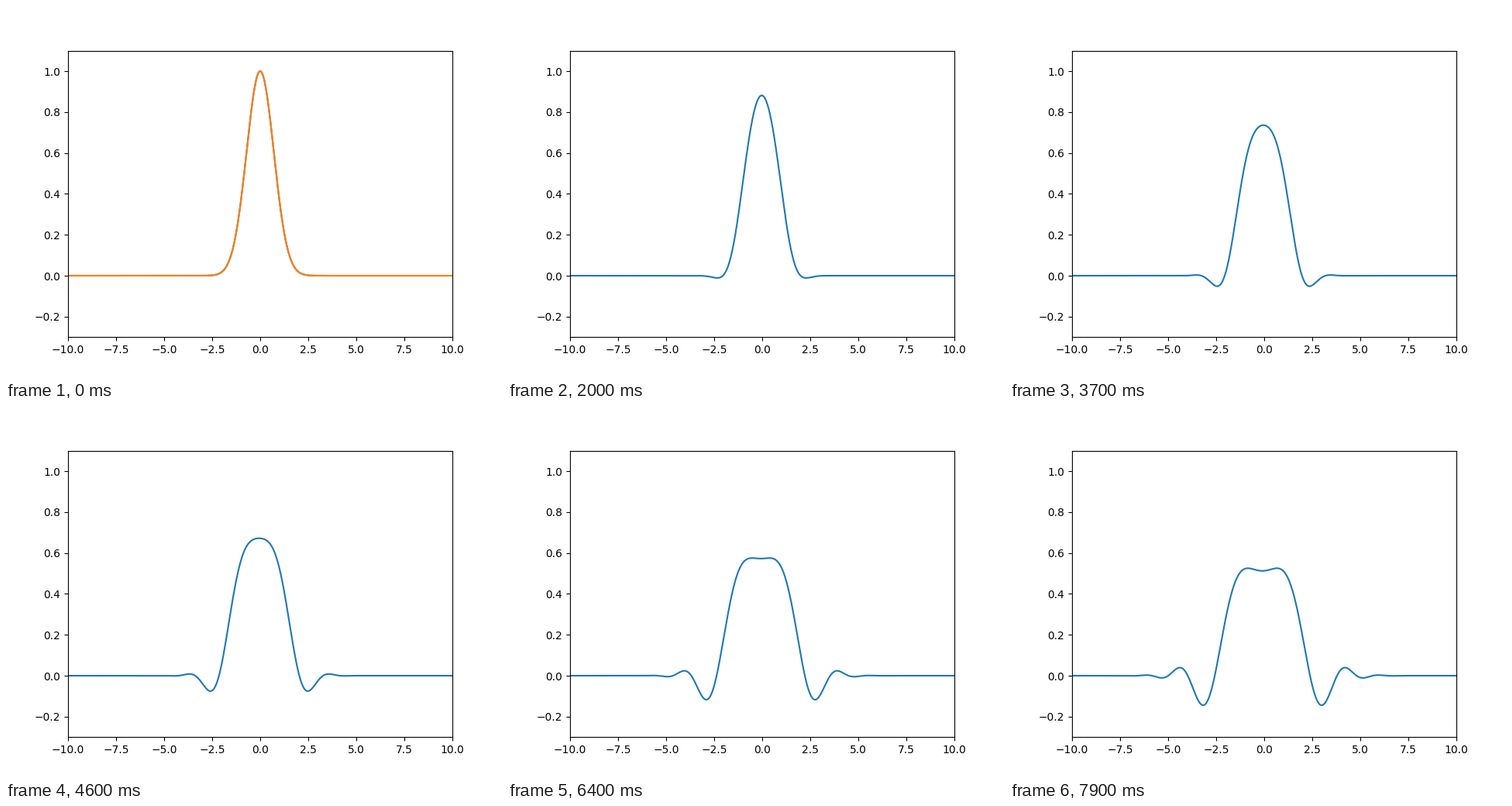
Recreate the animation shown at these times as a matplotlib script. Size 640 by 480 pixels, loop 8 s.

```python
import matplotlib.pyplot as plt
import numpy as np
from matplotlib.animation import FuncAnimation

FRAMES = 80
RATE = 0.0304      # dispersion per step
DRIFT = -0.00118   # sideways slip per step

x = np.linspace(-10, 10, 1001)


def packet(step):
    """Real part of a freely spreading Gaussian wave packet."""
    width = 1 + 1j * RATE * step
    return (np.exp(-(x - DRIFT * step) ** 2 / width) / np.sqrt(width)).real


fig, ax = plt.subplots(figsize=(6.4, 4.8), dpi=100)
ax.set_xlim(-10, 10)
ax.set_ylim(-0.3, 1.1)
wave, = ax.plot(x, packet(0), color="C0")
start, = ax.plot(x, packet(0), color="C1")


def update(i):
    wave.set_ydata(packet(i + 1))
    start.set_visible(i == 0)
    return wave, start


anim = FuncAnimation(fig, update, frames=FRAMES, interval=100,
                     repeat=True, repeat_delay=0, blit=False)
plt.show()
```
